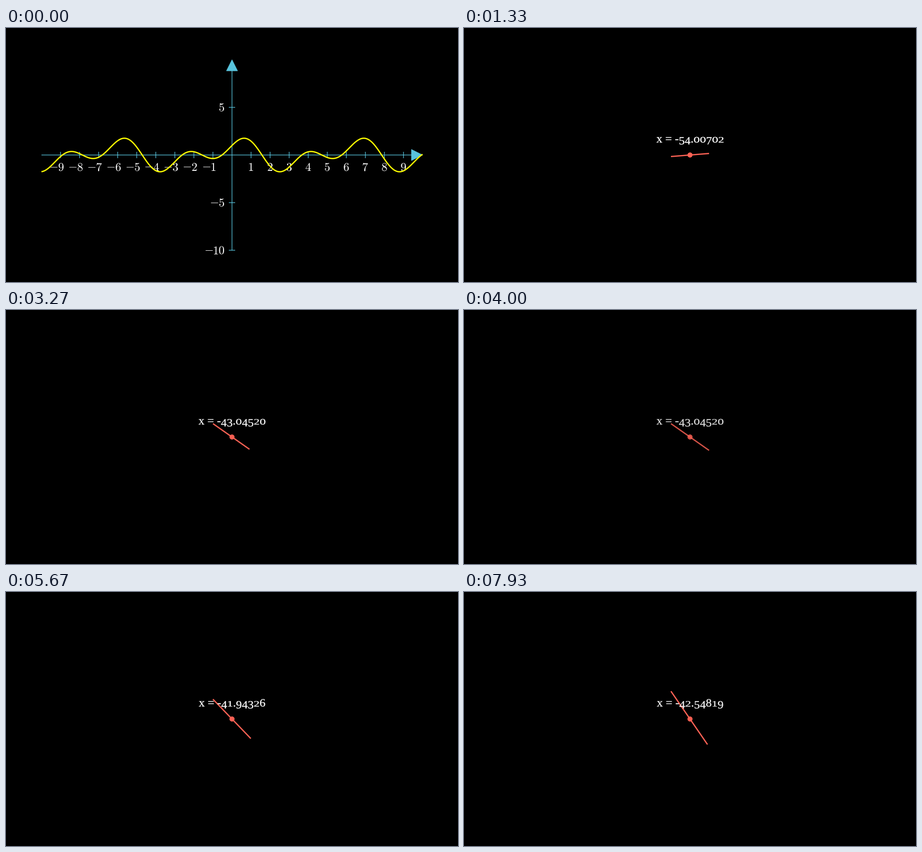
These frames come from a looping animation (854 px wide and 480 px high, 8000 ms). A matplotlib script:

```python
import numpy as np
import matplotlib.pyplot as plt
from matplotlib.animation import FuncAnimation
from matplotlib.patches import Circle, PathPatch, Polygon
from matplotlib.path import Path
from matplotlib.textpath import TextPath
from matplotlib.transforms import Affine2D

W, H, DPI = 854, 480, 64
LOOP_MS, TICK_MS = 8000, 20
STEPS_PER_MS = 15 / 1000        # the motion itself advances 15 times a second
LEAD_MS = 15                    # keeps step changes from landing a tick late
CX, CY = W / 2, H / 2
UX, UY = 36, 18                 # pixels per unit on each axis
BLUE, YELLOW, RED = "#58C4DD", "#FFFF00", "#FC6255"
ROOTS = [-54.00702, -43.04520, -41.94326, -42.54819]
FIRST, CYCLE = 8, 35            # step of the first tangent, steps per tangent

plt.rcParams["mathtext.fontset"] = "cm"


def f(x):
    return np.sin(2 * x) + np.cos(x)


def slope(x):
    return (2 * np.cos(2 * x) - np.sin(x)) * UY / UX


def smooth(t):
    t = min(max(t, 0), 1)
    sig = lambda v: 1 / (1 + np.exp(-v))
    low = sig(-5)
    return min(max((sig(10 * (t - 0.5)) - low) / (1 - 2 * low), 0), 1)


def pt(px):
    return px * 72 / DPI


def moved(path, dx, dy, sx=1, sy=1):
    return Path(path.vertices * [sx, sy] + [dx, dy], path.codes)


def number_path(text, em=22.4, gap=2.16):
    """Digits set side by side on a common bottom, y upwards."""
    parts, x = [], 0
    mid = TextPath((0, 0), "$5$", size=em).get_extents().height / 2
    for ch in text:
        glyph = TextPath((0, 0), f"${ch}$", size=em)
        box = glyph.get_extents()
        dy = mid - box.y1 if ch == "-" else -box.y0
        parts.append(moved(glyph, x - box.x0, dy))
        x += box.width + gap
    return Path.make_compound_path(*parts)


def old_style_path(text, em=22.3):
    """Serif text with old-style figures, y upwards."""
    font = {"family": "Liberation Serif"}
    glyph = lambda s: TextPath((0, 0), s, size=em, prop=font)
    bar = glyph("|").get_extents().x1
    x_height = glyph("x").get_extents().y1
    lining = glyph("1").get_extents().y1
    tall = 0.94 * lining
    parts, x = [], 0
    for ch in text:
        shape, sx, sy, dy = ch, 1, 1, 0
        if ch == "0":
            shape, sx = "o", 1.06
        elif ch in "12":
            sy = x_height / lining
        elif ch.isdigit():
            sy = tall / lining
            dy = x_height - tall if ch in "34579" else 0
        if ch != " ":
            parts.append(moved(glyph(shape), x, dy, sx, sy))
        x += sx * (glyph(shape + "|").get_extents().x1 - bar)
    return Path.make_compound_path(*parts)


fig = plt.figure(figsize=(W / DPI, H / DPI), dpi=DPI, facecolor="black")
ax = fig.add_axes([0, 0, 1, 1])
ax.set_xlim(0, W)
ax.set_ylim(H, 0)
ax.axis("off")

camera = Affine2D()
scene = camera + ax.transData
plot_parts = []


def stroke(xs, ys, color, width, **kw):
    line, = ax.plot(xs, ys, color=color, lw=pt(width), snap=False,
                    solid_capstyle="butt", **kw)
    return line


def scene_line(xs, ys, color=BLUE, width=1.2, z=1):
    plot_parts.append(stroke(xs, ys, color, width, transform=scene, zorder=z))


def scene_label(value, place):
    path = number_path(str(value))
    dx, dy = place(path.get_extents())
    label = PathPatch(moved(path, dx, dy, sy=-1), fc="white", lw=0,
                      transform=scene, zorder=2)
    plot_parts.append(ax.add_patch(label))


def tip(points):
    arrow = Polygon(points, fc=BLUE, ec=BLUE, lw=pt(0.8), joinstyle="miter",
                    transform=scene, zorder=1)
    plot_parts.append(ax.add_patch(arrow))


# axes
left, right, top, bottom = CX - 360, CX + 360, CY - 180, CY + 180
TIP = 21
scene_line([left, right - TIP], [CY, CY])
scene_line([CX, CX], [bottom, top + TIP])
tip([(right, CY), (right - TIP, CY - TIP / 2), (right - TIP, CY + TIP / 2)])
tip([(CX, top), (CX - TIP / 2, top + TIP), (CX + TIP / 2, top + TIP)])

minus_half = number_path("-").get_extents().width / 2
for v in [*range(-9, 0), *range(1, 10)]:
    x = CX + v * UX
    scene_line([x, x], [CY - 6, CY + 6])
    mid = x - (minus_half if v < 0 else 0)
    scene_label(v, lambda b: (mid - b.width / 2 - b.x0, CY + 15 + b.y1))

for v in (5, -5, -10):
    y = CY - v * UY
    scene_line([CX - 6, CX + 6], [y, y])
    scene_label(v, lambda b: (CX - 15 - b.x1, y + (b.y0 + b.y1) / 2))

# curve
xs = np.linspace(-10, 10, 801)
scene_line(CX + xs * UX, CY - f(xs) * UY, YELLOW, 2.4, z=3)

# tangent, dot and value
tangent = stroke([], [], RED, 2.4, zorder=4)
dot = ax.add_patch(Circle((CX, CY), 4.8, fc=RED, lw=0, zorder=5))
values = []
for root in ROOTS:
    path = old_style_path(f"x = {root:.5f}")
    box = path.get_extents()
    path = moved(path, CX - (box.x0 + box.x1) / 2, 220.2 + box.y0, sy=-1)
    values.append(ax.add_patch(PathPatch(path, fc="white", ec="white",
                                         lw=pt(0.3), zorder=6)))


def update(tick):
    n = int((tick * TICK_MS + LEAD_MS) * STEPS_PER_MS)
    pan = smooth(n / 3.75)
    camera.clear().translate(-ROOTS[0] * UX * pan, f(ROOTS[0]) * UY * pan)
    for part in plot_parts:
        part.set_visible(pan < 1)

    i, k = divmod(n - FIRST, CYCLE)
    grow = smooth(k / 7.5) if i >= 0 else 0
    left_over = 1 - smooth((k - 12) / 15)
    alpha = grow * left_over

    dx = np.array([-UX, -UX + 2 * UX * grow])
    tangent.set_data(CX + dx, CY - slope(ROOTS[max(i, 0)]) * dx)
    tangent.set_alpha(left_over)
    tangent.set_visible(alpha > 0)
    dot.set_alpha(alpha)
    dot.set_visible(alpha > 0)
    for j, value in enumerate(values):
        value.set_alpha(alpha)
        value.set_visible(j == i and alpha > 0)
    return [tangent, dot, *values]


anim = FuncAnimation(fig, update, frames=LOOP_MS // TICK_MS, interval=TICK_MS,
                     repeat=True, repeat_delay=0, blit=False)
plt.show()
```
